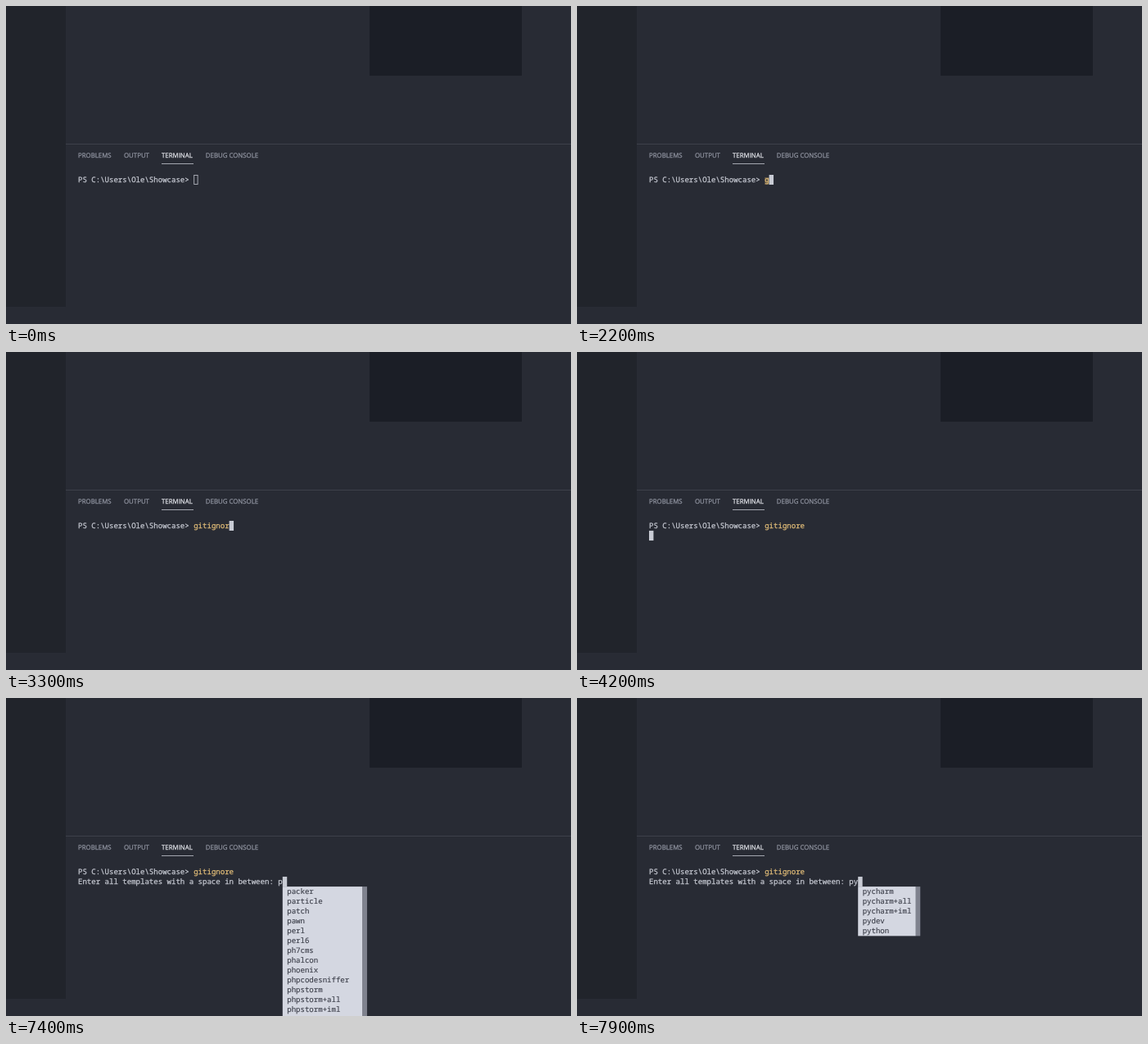
Animation of 690 by 388 pixels, one loop 8 s. Source, as an HTML page:

```html
<!DOCTYPE html>
<html lang="en">
<head>
<meta charset="utf-8">
<title>Terminal</title>
<style>
  html, body { margin: 0; width: 100%; height: 100%; overflow: hidden; background: #282b34; }
  svg { display: block; width: 690px; height: 388px; }
  text { fill: currentColor; stroke: currentColor; stroke-width: .25px; text-rendering: geometricPrecision; white-space: pre; }
  .tabs { font: 7.85px "Open Sans", "Noto Sans", sans-serif; color: #9094a0; }
  .tabs .on { color: #e0e2e8; }
  .term { font: 9.05px "Noto Sans Mono", "DejaVu Sans Mono", monospace; color: #c6c9d2; }
  .term .cmd { color: #e2bd78; }
  .menu text { color: #3c3f4a; stroke-width: .15px; }
</style>
</head>
<body>
<svg viewBox="0 0 690 388">
  <rect width="690" height="388" fill="#282b34"/>
  <rect width="73" height="367" fill="#21242b"/>
  <rect x="444" y="-101" width="186" height="186" fill="#1b1e26"/>
  <rect x="73" y="168" width="617" height="1" fill="#3d404a"/>
  <g class="tabs">
    <text x="88" y="185">PROBLEMS</text>
    <text x="144" y="185">OUTPUT</text>
    <text x="190" y="185" class="on">TERMINAL</text>
    <text x="243.8" y="185">DEBUG CONSOLE</text>
    <rect x="190" y="192" width="39" height="1" fill="#a4a7b0"/>
  </g>
  <g class="term">
    <text id="path"></text>
    <rect id="trail" fill="#e2bd78" opacity=".3"/>
    <text id="cmd" class="cmd"></text>
    <text id="ask"></text>
    <g id="menuP" class="menu"></g>
    <g id="menuPy" class="menu"></g>
    <rect id="cursor"/>
  </g>
</svg>
<script>
const LOOP = 8000, LEFT = 88, TOP = 206, CW = 5.43, LH = 12.05;
const PROMPT = 'PS C:\\Users\\Ole\\Showcase> ';
const COMMAND = 'gitignore';
const QUESTION = 'Enter all templates with a space in between: ';
const KEYS = [2200, 2400, 2500, 2700, 2800, 3000, 3100, 3300, 3400];
const FOCUS = 1000, ENTER = 4200, ASK = 6000, KEY_P = 7400, KEY_Y = 7700;

const $ = id => document.getElementById(id);
const col = c => LEFT + c * CW;
const row = r => TOP + r * LH;

function set(el, attrs) {
  for (const k in attrs) el.setAttribute(k, attrs[k]);
  return el;
}

function add(parent, tag, attrs) {
  const el = document.createElementNS('http://www.w3.org/2000/svg', tag);
  return parent.appendChild(set(el, attrs));
}

const place = (el, c, r) => set(el, { x: col(c), y: row(r) + 8.6 });
const show = (el, on) => set(el, { visibility: on ? 'visible' : 'hidden' });

function buildMenu(g, c, cols, words) {
  const items = words.split(' ');
  const box = { y: row(2), height: items.length * LH };
  add(g, 'rect', { ...box, x: col(c), width: cols * CW, fill: '#d4d7e1' });
  add(g, 'rect', { ...box, x: col(c + cols), width: CW, fill: '#7f828e' });
  items.forEach((word, i) => {
    place(add(g, 'text', {}), c + 1, i + 2).textContent = word;
  });
}

place($('path'), 0, 0).textContent = PROMPT;
place($('cmd'), PROMPT.length, 0);
place($('ask'), 0, 1);
set($('trail'), { x: col(PROMPT.length), y: TOP + 3, width: CW, height: 9 });
buildMenu($('menuP'), 46, 18, 'packer particle patch pawn perl perl6 ph7cms phalcon ' +
  'phoenix phpcodesniffer phpstorm phpstorm+all phpstorm+iml pimcore');
buildMenu($('menuPy'), 47, 13, 'pycharm pycharm+all pycharm+iml pydev python');

function drawCursor(c, r, filled) {
  const inset = filled ? 0 : 0.5;
  set($('cursor'), {
    x: col(c) + inset, y: row(r) + inset,
    width: CW - 2 * inset, height: 12 - 2 * inset,
    fill: filled ? '#c8cbd4' : 'none',
    stroke: filled ? 'none' : '#b0b3bc',
    'stroke-width': 0.9
  });
}

function draw(t) {
  const typed = KEYS.filter(k => t >= k).length;
  const answer = t >= KEY_Y ? 'py' : t >= KEY_P ? 'p' : '';
  const line = t >= ASK ? QUESTION + answer : '';
  $('cmd').textContent = COMMAND.slice(0, typed);
  $('ask').textContent = line;
  show($('trail'), typed === 1);
  show($('menuP'), answer === 'p');
  show($('menuPy'), answer === 'py');
  if (t >= ENTER) drawCursor(line.length, 1, true);
  else drawCursor(PROMPT.length + typed, 0, t >= FOCUS);
}

const start = performance.now();
function tick() {
  draw((performance.now() - start) % LOOP);
  requestAnimationFrame(tick);
}
tick();
</script>
</body>
</html>
```
